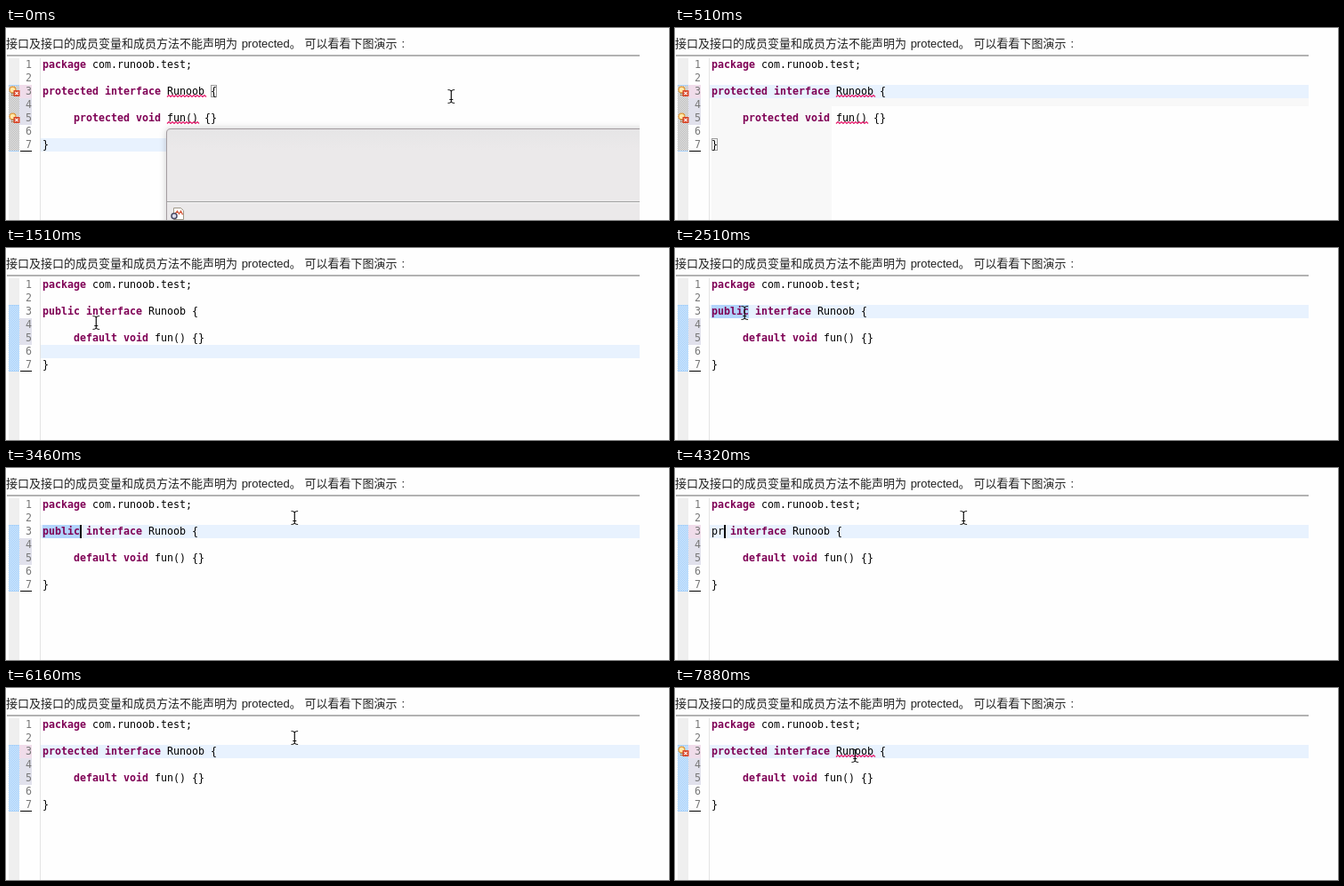
Write an HTML page that moves like this. It is 745 by 216 pixels and loops after 8 s.

```html
<!DOCTYPE html>
<html lang="zh">
<head>
<meta charset="utf-8">
<style>
html, body { margin: 0; width: 100%; height: 100%; overflow: hidden; background: #fefefe; }
svg { display: block; }
text { white-space: pre; }
.title { font: 13px "Liberation Sans", "Noto Sans CJK SC", "Noto Sans CJK", sans-serif; fill: #222; }
.code { font: 11.63px "DejaVu Sans Mono", monospace; fill: #000; }
.key { font-weight: bold; fill: #7f0055; }
.num { fill: #787878; }
</style>
</head>
<body>
<svg width="745" height="216" viewBox="0 0 745 216">
  <defs>
    <pattern id="grey" width="2" height="2" patternUnits="userSpaceOnUse">
      <rect width="2" height="2" fill="#f0f0f0"/>
      <path d="M0 0h1v1h-1zM1 1h1v1h-1z" fill="#b0b0b0"/>
    </pattern>
    <pattern id="blue" width="2" height="2" patternUnits="userSpaceOnUse">
      <rect width="2" height="2" fill="#e8f0f8"/>
      <path d="M0 0h1v1h-1zM1 1h1v1h-1z" fill="#90c8ff"/>
    </pattern>
    <linearGradient id="panel" x2="0" y2="1">
      <stop offset="0" stop-color="#e6e5e6"/>
      <stop offset=".2" stop-color="#ebe9ea"/>
    </linearGradient>
    <filter id="soft" x="-10%" y="-20%" width="120%" height="140%"><feGaussianBlur stdDeviation="4"/></filter>
    <clipPath id="pane"><rect y="30" width="712" height="186"/></clipPath>
  </defs>
  <text class="title" x="0" y="22">接口及接口的成员变量和成员方法不能声明为<tspan dx="1"> protected</tspan>。 可以看看下图演示<tspan dx="5">:</tspan></text>
  <path d="M1 31h711" stroke="#999" stroke-width="1.6"/>
  <rect x="3" y="34" width="12" height="182" fill="#efefef"/>
  <path d="M38.5 34v182" stroke="#e4e4e4"/>
  <g id="scene" clip-path="url(#pane)"></g>
</svg>
<script>
const LOOP = 8000, CHAR = 7, LEFT = 41;
const KEYS = /^(package|protected|public|default|interface|void)$/;
const stage = document.getElementById('scene');

const rowY = row => 34 + 15 * (row - 1);
const colX = col => LEFT + CHAR * col;
const rect = (x, y, w, h, fill, more = '') =>
  `<rect x="${x}" y="${y}" width="${w}" height="${h}" fill="${fill}" ${more}/>`;
const label = (x, row, cls, s) =>
  `<text class="code ${cls}" x="${x}" y="${rowY(row) + 11}">${s}</text>`;

// One line of code; each word sits on the character grid
function codeLine(row, col, src, plainFirst) {
  let out = '';
  src.split(' ').forEach((word, i) => {
    const key = KEYS.test(word) && !(plainFirst && i === 0);
    if (word) out += label(colX(col), row, key ? 'key' : '', word);
    col += word.length + 1;
  });
  return out;
}

function squiggle(row, col, chars) {
  const wave = 'l2 -2l2 2'.repeat(Math.round(chars * CHAR / 4));
  return `<path d="M${colX(col)} ${rowY(row) + 13.5}${wave}" fill="none" stroke="#e5196b" stroke-width="1.2"/>`;
}

function marker(row) {
  return `<g transform="translate(3 ${rowY(row)})">
    <circle cx="4.5" cy="5.5" r="3.4" fill="#ffe9a8" stroke="#e39a3c" stroke-width="1.3"/>
    <path d="M3 9.5h3M3 11.5h3" stroke="#a77a4a"/>
    <rect x="5.5" y="6" width="7" height="7" fill="#d9482b"/>
    <path d="M7.3 7.8l3.4 3.4m0-3.4l-3.4 3.4" stroke="#fff" stroke-width="1.2"/></g>`;
}

const bracketBox = (row, col) =>
  rect(colX(col) + .5, rowY(row) + .5, 6, 13, 'none', 'stroke="#9a9a9a"');

const beam = ([x, y]) => `<g transform="translate(${x} ${y})" fill="none">
  <path d="M-3.5 -7.5q3 0 3.8 1.5q.8 -1.5 3.8 -1.5M.3 -6v12M-3.5 7.5q3 0 3.8 -1.5q.8 1.5 3.8 1.5M-1.7 3.5h4"
    stroke="#111" stroke-width="1.2"/></g>`;

function dialog(opacity) {
  const box = 'M180.5 230V118q0 -4.5 4.5 -4.5H730V230z';
  return `<g opacity="${opacity}">
    <path d="${box}" fill="#000" opacity=".22" filter="url(#soft)"/>
    <path d="${box}" fill="url(#panel)" stroke="#a39ca0"/>
    <path d="M181 195.5H712" stroke="#a0a0a0"/>
    <path d="M181 196.5H712" stroke="#f6f6f6"/>
    <path d="M188.5 202.5h8l3 3v10h-11z" fill="#fff" stroke="#a09888"/>
    <path d="M190 209l2.5 -3l2 3l2 -3l2 4" fill="none" stroke="#d4583a" stroke-width="1.3"/>
    <circle cx="189" cy="211.5" r="3" fill="#dde" stroke="#4a4a62" stroke-width="1.5"/></g>`;
}

// Pointer runs: start, step length, then [time, x, y] stops
const RUNS = [
  [0, 200, [[0, 500, 77]]],
  [910, 100, [[910, 81, 137], [1510, 101, 84], [1710, 100, 61], [1820, 95, 66]]],
  [1970, 126, [[1970, 90, 70], [2222, 72, 73], [2474, 78, 73], [2600, 101, 71], [2978, 324, 56]]],
  [6770, 137, [[6770, 330, 66], [7044, 348, 97], [7318, 287, 87], [7729, 202, 76]]]
];

function pointer(t) {
  if (t >= 200 && t < 910) return null;
  const [start, step, stops] = RUNS.filter(r => r[0] <= t).pop();
  const q = start + Math.floor((t - start) / step) * step;
  const i = stops.findIndex(s => s[0] > q);
  if (i < 0) return stops[stops.length - 1].slice(1);
  const a = stops[i - 1], b = stops[i], k = (q - a[0]) / (b[0] - a[0]);
  return [1, 2].map(n => Math.round(a[n] + (b[n] - a[n]) * k));
}

function typedCount(t) {
  if (t < 5000) return Math.min(5, 1 + Math.floor((t - 4050) / 137.5));
  return t < 5700 ? 6 : t < 5850 ? 7 : t < 6160 ? 8 : 9;
}

// Column of the caret on line 3, or -1 while it is hidden
function caretCol(t, typed) {
  if (t >= 200 && t < 510) return 28;
  if (t >= 3460 && t < 3910) return 6;
  if (t >= 4050 && t < 5150 || t >= 5550 && t < 6160) return typed;
  return t >= 7730 && t < 7880 ? 23 : -1;
}

function draw(t) {
  const old = t < 810, typing = t >= 4050;
  const typed = typing ? typedCount(t) : 0;
  const word = old ? 'protected' : typing ? 'protected'.slice(0, typed) : 'public';
  const selected = t >= 2222 && !typing;
  const active = t < 120 ? 7 : old ? 3 : t < 2222 ? 6 : 3;
  const error = old || t >= 7044;
  let s = '';

  if (t >= 200 && old) s += '<path d="M41 79H712V88H176V216H41z" fill="#f8f8f8"/>';
  s += rect(3, 64, 12, 75, old ? 'url(#grey)' : 'url(#blue)');
  s += '<path d="M3 64.5h12M3 138.5h12" stroke="#a9d2fa"/>';
  s += rect(39, rowY(active), 673, 15, '#e8f2fe');
  if (selected) s += rect(LEFT, rowY(3), 42, 15, '#b2d4fd');
  s += rect(15, rowY(4), 14, 30, '#e1e1ec');
  if (old || typing) s += rect(15, rowY(3), 14, 15, '#f0dcea');
  for (let n = 1; n <= 7; n++) s += label(22, n, 'num', n);
  s += rect(16, 138, 13, 1, '#000');

  if (t < 120) s += bracketBox(3, 27);
  else if (old) s += bracketBox(7, 0);

  s += codeLine(1, 0, 'package com.runoob.test;');
  s += codeLine(3, 0, word + ' interface Runoob {', typing && typed < 9);
  s += codeLine(5, 5, (old ? 'protected' : 'default') + ' void fun() {}');
  s += codeLine(7, 0, '}');

  if (error) s += marker(3) + squiggle(3, 20, 6);
  if (old) s += marker(5) + squiggle(5, 20, 5);

  const caret = caretCol(t, typed);
  if (caret >= 0) s += rect(colX(caret), rowY(3), 2, 15, '#000');
  if (t < 200) s += dialog(t < 120 ? 1 : .4);
  const p = pointer(t);
  if (p) s += beam(p);
  return s;
}

let last = '';
function tick() {
  const next = draw(performance.now() % LOOP);
  if (next !== last) stage.innerHTML = last = next;
  requestAnimationFrame(tick);
}
tick();
</script>
</body>
</html>
```
